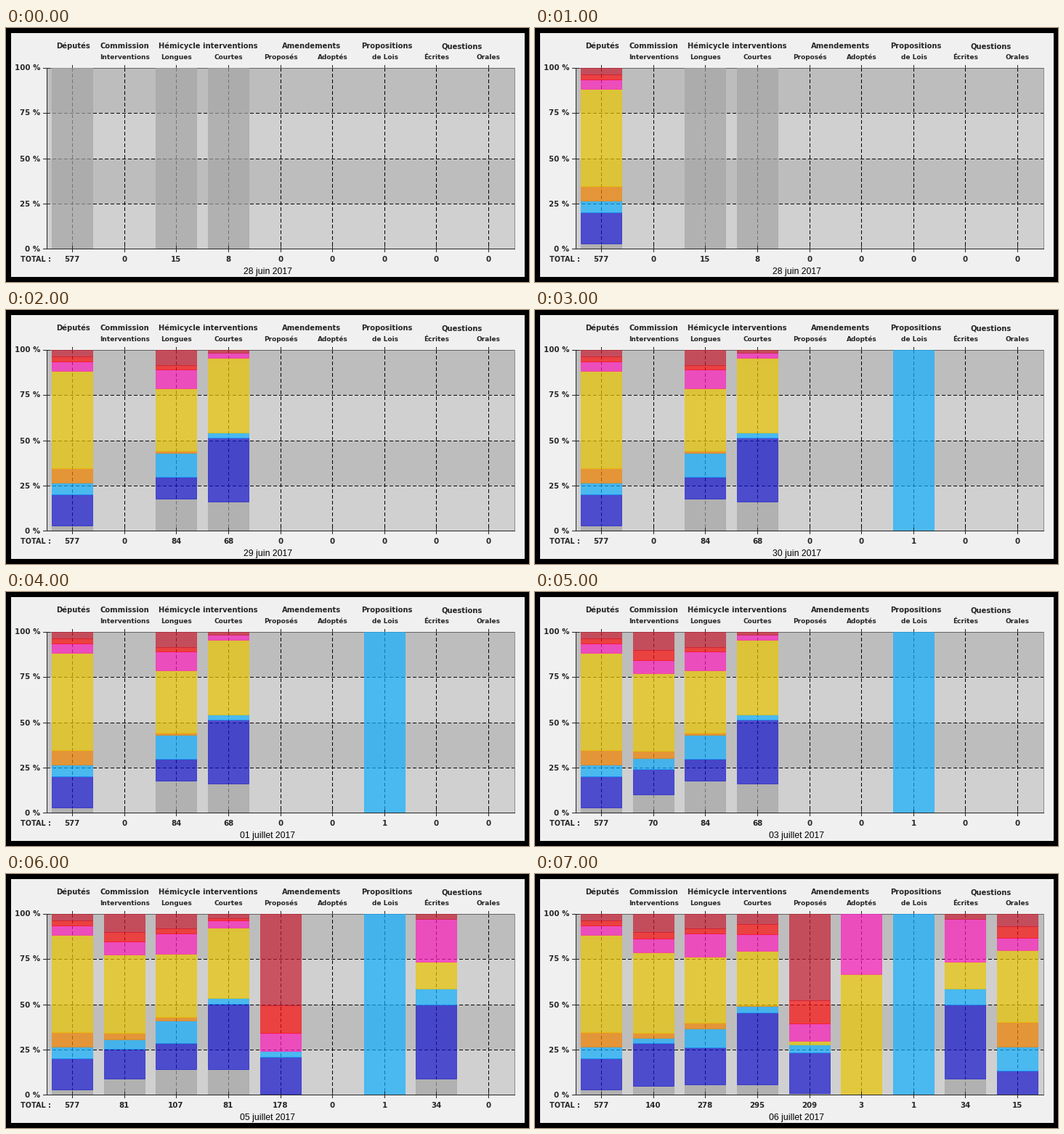
These frames come from a looping animation (720x350 px, 8 s). A matplotlib script:

```python
import math

import matplotlib.pyplot as plt
import numpy as np
from matplotlib.animation import FuncAnimation
from matplotlib.patches import Rectangle

W, H, DPI = 720, 350, 100
PX = 72 / DPI                      # points per pixel
LEFT, RIGHT, TOP, BASE = 56, 700, 55, 304
HALF = 28                          # half a bar's width
INK = "#262626"

# Political groups, stacked from the bottom up
COLORS = np.array([(165, 165, 165), (20, 20, 205), (18, 176, 255), (246, 133, 0),
                   (234, 198, 0), (255, 30, 190), (254, 13, 13), (200, 30, 50)]) / 255

HEADS = [("Députés", 93), ("Commission", 163.5), ("Hémicycle interventions", 278),
         ("Amendements", 421), ("Propositions", 524.5), ("Questions", 627.5)]
DATES = ["28 juin", "28 juin", "29 juin", "30 juin",
         "01 juillet", "03 juillet", "05 juillet", "06 juillet"]

# Each column: label, {step: total from then on}, key tallies by group.
# Tallies between two keys follow from the total alone.
COLUMNS = [
    ("", {0: 577}, [[17, 100, 35, 47, 310, 31, 17, 20]]),
    ("Interventions", {5: 70, 6: 81, 7: 140},
     [[7, 10, 4, 3, 30, 5, 4, 7], [7, 33, 4, 4, 62, 11, 5, 14]]),
    ("Longues", {0: 15, 2: 84, 6: 107, 7: 278},
     [[15], [15, 10, 11, 1, 29, 9, 2, 7], [16, 57, 29, 9, 101, 36, 8, 22]]),
    ("Courtes", {0: 8, 2: 68, 6: 81, 7: 295},
     [[8], [11, 24, 2, 0, 28, 2, 0, 1], [16, 118, 11, 1, 88, 28, 17, 16]]),
    ("Proposés", {6: 178, 7: 209},
     [[1, 36, 6, 0, 0, 18, 27, 90], [2, 47, 9, 0, 4, 20, 27, 100]]),
    ("Adoptés", {7: 3}, [[0, 0, 0, 0, 2, 1]]),
    ("de Lois", {3: 1}, [[0, 0, 1]]),
    ("Écrites", {6: 34}, [[3, 14, 3, 0, 5, 8, 0, 1]]),
    ("Orales", {7: 15}, [[0, 2, 2, 2, 6, 1, 1, 1]]),
]

fig = plt.figure(figsize=(W / DPI, H / DPI), dpi=DPI, facecolor="black")
ax = fig.add_axes([0, 0, 1, 1])
ax.set_xlim(0, W)
ax.set_ylim(H, 0)
ax.axis("off")


def pixel(v):
    """Middle of the pixel that holds v."""
    return math.floor(v) + 0.5


def center(col):
    return pixel(LEFT + (RIGHT - LEFT) * (col + 0.5) / len(COLUMNS))


def box(x0, y0, x1, y1, color, z=0):
    ax.add_patch(Rectangle((x0, y0), x1 - x0, y1 - y0, fc=color, lw=0, zorder=z))


def line(x0, y0, x1, y1, color=INK, z=5, dashed=False):
    ax.plot([x0, x1], [y0, y1], color=color, lw=PX, zorder=z, snap=False,
            ls=(0, (5, 3)) if dashed else "-",
            solid_capstyle="butt", dash_capstyle="butt")


def label(x, y, text, size=10, ha="center", family="DejaVu Sans",
          weight="bold", color=INK):
    return ax.text(x, y, text, fontsize=size * PX, ha=ha, va="baseline",
                   family=family, weight=weight, color=color, zorder=6)


def draw_chart():
    box(7, 7, 714, 343, "#f0f0f0")
    edges = [math.floor(y + 0.5) for y in np.linspace(TOP, BASE, 5)]
    for k in range(4):
        box(LEFT, edges[k], RIGHT + 1, edges[k + 1],
            "#d0d0d0" if k % 2 else "#bdbdbd", 1)
    for k, edge in enumerate(edges):
        y = pixel(edge)
        if 0 < k < 4:
            line(LEFT, y, RIGHT, y, "black", 2, dashed=True)
        line(LEFT - 5, y, LEFT + 5, y)
        label(47, edge + 3.5, f"{100 - 25 * k} %", 10.2, ha="right")
    for col, (name, _, _) in enumerate(COLUMNS):
        x = center(col)
        line(x, TOP, x, BASE, "black", 2, dashed=True)
        line(x, TOP - 4, x, TOP)
        line(x, BASE - 4, x, BASE + 5)
        label(x, 43.4, name, 9)
    line(LEFT, pixel(TOP), RIGHT, pixel(TOP), "#646464", 2)
    line(pixel(RIGHT), TOP, pixel(RIGHT), BASE, "#8c8c8c", 2)
    line(pixel(LEFT), TOP, pixel(LEFT), BASE + 1)
    line(LEFT, pixel(BASE), RIGHT + 1, pixel(BASE))
    for text, x in HEADS:
        label(x, 28, text)
    label(20, 322, "TOTAL :", 9.7, ha="left")


draw_chart()
totals = [label(center(col) - 0.5, 322, "", 10.3) for col in range(len(COLUMNS))]
date = label(360.5, 339, "", 12.2, family="Liberation Sans",
             weight="normal", color="black")
bars = []


def tally(total, keys):
    """Votes per group, interpolated between the key tallies by their sums."""
    padded = np.array([key + [0] * (len(COLORS) - len(key)) for key in keys])
    return [np.interp(total, padded.sum(axis=1), group) for group in padded.T]


def stack(col, total, counts):
    x = center(col) - HALF
    low, done = pixel(BASE), 0
    for count, color in zip(counts, COLORS):
        done += count
        top = pixel(BASE + 0.5 - (BASE - TOP) * done / total)
        if count > 0.5:
            bar = Rectangle((x, top), 2 * HALF, low - top, fc=(*color, 0.7),
                            ec=(*color, 0.6), lw=PX, zorder=3, snap=False)
            bars.append(ax.add_patch(bar))
            low = top


def update(step):
    while bars:
        bars.pop().remove()
    for col, (_, growth, keys) in enumerate(COLUMNS):
        total = max((n for start, n in growth.items() if start <= step), default=0)
        totals[col].set_text(str(total))
        if total:
            # No groups are formed yet at the very start
            stack(col, total, tally(total, keys) if step else [total])
    date.set_text(f"{DATES[step]} 2017")
    return bars + totals + [date]


anim = FuncAnimation(fig, update, frames=len(DATES), init_func=lambda: update(0),
                     interval=1000, repeat=True, repeat_delay=0, blit=False)
plt.show()
```
